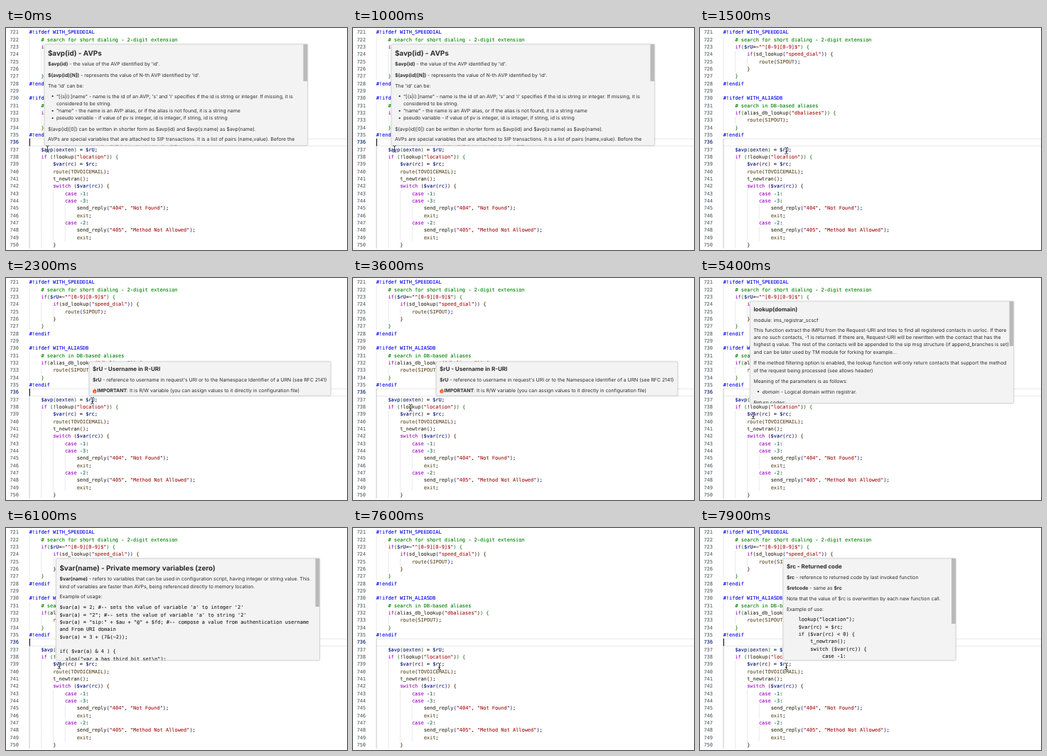
Recreate the animation shown at these times as an HTML page. Size 480 px wide and 313 px high, loop 8000 ms.

```html
<!DOCTYPE html>
<html lang="en">
<head>
<meta charset="utf-8">
<title>Editor hover help</title>
<style>
  html, body { margin: 0; width: 100%; height: 100%; overflow: hidden; background: #fff; }
  #stage { display: block; width: 480px; height: 313px; }
  text { white-space: pre; text-rendering: geometricPrecision; fill: currentColor; }
  .code { font: 6.95px "DejaVu Sans Mono", monospace; color: #222; }
  .code, .code tspan { fill: currentColor; stroke: currentColor; stroke-width: .1; }
  .help { font: 6.91px Inter, sans-serif; color: #2d2d2d; transform: translateY(-.4px); }
  .h2, .h3, .b { font-weight: 700; }
  .h2 { font-size: 9.87px; }
  .h3 { font-size: 8.02px; }
  .i { font-style: italic; }
  .box { fill: #f3f3f3; stroke: #c8c8c8; stroke-width: .6; filter: drop-shadow(0 .6px 1.2px rgba(0,0,0,.15)); }
  .thumb { fill: #bababa; }
  .guide { stroke: #d9d9d9; stroke-width: .58; }
  .guide.active { stroke: #a0a0a0; }
</style>
</head>
<body>
<svg id="stage" viewBox="0 0 480 313" xmlns="http://www.w3.org/2000/svg">
  <path d="M32.5 156.4H480M32.5 166.4H480" stroke="#e6e6e6" stroke-width=".9"/>
  <g id="editor"></g>
  <rect id="caret" x="32.8" y="156" width="1.1" height="10.3" fill="#111"/>
  <g id="hovers"></g>
  <g id="pointer" fill="none" stroke-linecap="round">
    <use href="#beam" stroke="#fff" stroke-width="1.8"/>
    <use href="#beam" stroke="#111" stroke-width=".85"/>
  </g>
  <defs>
    <path id="beam" d="M-2-4.6Q-.3-4.6 0-3.6Q.3-4.6 2-4.6M0-3.6V3.6M-2 4.6Q-.3 4.6 0 3.6Q.3 4.6 2 4.6M-1 1.4H1"/>
  </defs>
</svg>
<script>
const LOOP = 8000, STEP = 100;
const CHAR = 4.184, ROW = 10.335, LEFT = 32.7, TOP = 8.3, FIRST = 721, ACTIVE = 736;
const $ = id => document.getElementById(id);
const escapeText = s => s.replace(/&/g, '&amp;').replace(/</g, '&lt;');

const source = `#!ifdef WITH_SPEEDDIAL
    # search for short dialing - 2-digit extension
    if($rU=~"^[0-9][0-9]$") {
        if(sd_lookup("speed_dial")) {
            route(SIPOUT);
        }
    }
#!endif

#!ifdef WITH_ALIASDB
    # search in DB-based aliases
    if(alias_db_lookup("dbaliases")) {
        route(SIPOUT);
    }
#!endif

    $avp(oexten) = $rU;
    if (!lookup("location")) {
        $var(rc) = $rc;
        route(TOVOICEMAIL);
        t_newtran();
        switch ($var(rc)) {
            case -1:
            case -3:
                send_reply("404", "Not Found");
                exit;
            case -2:
                send_reply("405", "Method Not Allowed");
                exit;
        }`.split('\n');

// Syntax colours; brackets cycle through three colours by depth.
const rules = [
  [/^#!.*/, '#0000e6'], [/^#.*/, '#008000'], [/^"[^"]*"/, '#a31515'],
  [/^(if|switch|case)\b/, '#9d0cc2'], [/^-?\d+/, '#0a7350'],
  [/^\$\w+/, '#001080'], [/^(route|exit)\b/, '#5c4820'], [/^\w+(?=\()/, '#33301f'],
  [/^[A-Z]+\b/, '#5c4820'], [/^\w+/, '#1a2060'], [/^[(){}]/, null], [/^[^\w"$#(){}-]+|^./, '#222']
];
const bracketColors = ['#1c2f9c', '#2c7f2c', '#5e3018'];
let depth = 1;

function bracketColor(ch) {
  return bracketColors[('({'.includes(ch) ? depth++ : --depth) % 3];
}

function highlight(text) {
  let out = '';
  while (text) {
    const [pattern, color] = rules.find(([p]) => p.test(text));
    const token = text.match(pattern)[0];
    out += `<tspan style="color:${color || bracketColor(token)}">${escapeText(token)}</tspan>`;
    text = text.slice(token.length);
  }
  return out;
}

function guides(indent, y, active) {
  let out = '';
  for (let col = 0; col < indent; col += 4) {
    const x = LEFT + .3 + col * CHAR;
    out += `<path class="guide${active && !col ? ' active' : ''}" d="M${x} ${y}v${ROW}"/>`;
  }
  return out;
}

$('editor').innerHTML = source.map((line, i) => {
  const number = FIRST + i, y = TOP + i * ROW;
  const body = line.trimStart(), indent = line.length - body.length;
  return guides(number === ACTIVE ? 4 : indent, y - 7.5, number >= ACTIVE) +
    `<text class="code" x="5.4" y="${y}" style="color:${number === ACTIVE ? '#0b216f' : '#5a646a'}">${number}</text>` +
    `<text class="code" x="${LEFT + indent * CHAR}" y="${y}">${highlight(body)}</text>`;
}).join('');

// Text entries: [baseline, markup, style, x offset]
const hovers = [
  { from: 0, to: 1300, box: [54, 23, 370.5, 142.5], thumb: 52, text: [
    [39.3, '$avp(id) - AVPs', 'h2'],
    [53.5, '<b>$avp(id)</b> - the value of the AVP identified by \'id\'.'],
    [69, '<b>$(avp(id)[N])</b> - represents the value of N-th AVP identified by \'id\'.'],
    [84.3, 'The \'id\' can be:'],
    [99, '"[(s|i):]name" - name is the id of an AVP; \'s\' and \'i\' specifies if the id is string or integer. If missing, it is', 'item', 12],
    [109.3, 'considered to be string.', '', 12],
    [119.6, '"name" - the name is an AVP alias, or if the alias is not found, it is a string name', 'item', 12],
    [129.9, 'pseudo variable - if value of pv is integer, id is integer, if string, id is string', 'item', 12],
    [145, '$(avp(id)[0]) can be written in shorter form as $avp(id) and $avp(s:name) as $avp(name).'],
    [159.8, 'AVPs are special variables that are attached to SIP transactions. It is a list of pairs (name,value). Before the'],
    [170, 'transaction is created, the AVP list is attached to the SIP request.']
  ] },
  { from: 1700, to: 3700, box: [117, 118, 340, 48], flame: true, text: [
    [131.8, '$rU - Username in R-URI', 'h3'],
    [146.2, '<b>$rU</b> - reference to username in request\'s URI or to the Namespace Identifier of a URN (see RFC 2141)'],
    [161.2, '<b>IMPORTANT</b>: It is R/W variable (you can assign values to it directly in configuration file)', '', 6.4]
  ] },
  { from: 4000, to: 5500, box: [70.5, 33, 371, 143.5], thumb: 63, text: [
    [47.4, 'lookup(domain)', 'h3'],
    [62, 'module: ims_registrar_scscf'],
    [76, 'This function extract the IMPU from the Request-URI and tries to find all registered contacts in usrloc. If there'],
    [86.4, 'are no such contacts, -1 is returned. If there are, Request-URI will be rewritten with the contact that has the'],
    [96.8, 'highest q value. The rest of the contacts will be appended to the sip msg structure (if append_branches is set)'],
    [107.2, 'and can be later used by TM module for forking for example...'],
    [122.8, 'If the method filtering option is enabled, the lookup function will only return contacts that support the method'],
    [133.2, 'of the request being processed (see allows header)'],
    [148.2, 'Meaning of the parameters is as follows:'],
    [163, '<i>domain</i> - Logical domain within registrar.', 'item', 12],
    [178, 'Return codes:']
  ] },
  { from: 5800, to: 7400, box: [70.5, 43, 371, 143.5], thumb: 68, text: [
    [60.2, '$var(name) - Private memory variables (zero)', 'h2'],
    [74.6, '<b>$var(name)</b> - refers to variables that can be used in configuration script, having integer or string value. This'],
    [85, 'kind of variables are faster than AVPs, being referenced directly to memory location.'],
    [99.8, 'Example of usage:'],
    [114.2, '$var(a) = 2; #-- sets the value of variable \'a\' to integer \'2\'', 'code'],
    [124.5, '$var(a) = "2"; #-- sets the value of variable \'a\' to string \'2\'', 'code'],
    [134.9, '$var(a) = "sip:" + $au + "@" + $fd; #-- compose a value from authentication username', 'code'],
    [145.2, 'and From URI domain', 'code'],
    [155.5, '$var(a) = 3 + (7&amp;(~2));', 'code'],
    [176.2, 'if( $var(a) &amp; 4 ) {', 'code'],
    [186.5, 'xlog("var a has third bit set\\n");', 'code', 2 * CHAR]
  ] },
  { from: 7800, to: 8000, box: [117, 43, 243, 143.5], thumb: 92, text: [
    [57.8, '$rc - Returned code', 'h3'],
    [72, '<b>$rc</b> - reference to returned code by last invoked function'],
    [87, '<b>$retcode</b> - same as <b>$rc</b>'],
    [102, 'Note that the value of $rc is overwritten by each new function call.'],
    [117, 'Example of use:'],
    [131.2, 'lookup("location");', 'code', 4 * CHAR],
    [141.5, '$var(rc) = $rc;', 'code', 4 * CHAR],
    [151.9, 'if ($var(rc) &lt; 0) {', 'code', 4 * CHAR],
    [162.2, 't_newtran();', 'code', 8 * CHAR],
    [172.5, 'switch ($var(rc)) {', 'code', 8 * CHAR],
    [182.9, 'case -1:', 'code', 12 * CHAR]
  ] }
];

function helpLine(left, [y, markup, style = '', offset = 0]) {
  const x = left + offset;
  const spans = markup.replace(/<([bi])>/g, '<tspan class="$1">').replace(/<\/[bi]>/g, '</tspan>');
  const bullet = style === 'item' ? `<circle cx="${x - 5.3}" cy="${y - 2.8}" r="1.1" fill="#2d2d2d"/>` : '';
  return `${bullet}<text class="${style === 'code' ? style : 'help ' + style}" x="${x}" y="${y}">${spans}</text>`;
}

const flame = (x, y) => `<g transform="translate(${x} ${y})">
  <path d="M2.8 0C3.2 2 5.8 2.8 5.5 5A2.6 2.4 0 0 1 .3 5C.2 3.7 1 3.2 1.1 2.2Q2 2.5 2 3.2Q3.2 2 2.8 0Z" fill="#e8482c"/>
  <path d="M3 3.6Q4.5 4.6 4.1 6A1.3 1.1 0 0 1 1.7 6Q1.6 4.9 3 3.6Z" fill="#ffb13d"/></g>`;

$('hovers').innerHTML = hovers.map(({ box: [x, y, w, h], thumb, text, flame: hot }) => `<g>
  <rect class="box" x="${x}" y="${y}" width="${w}" height="${h}" rx="1"/>
  <svg x="${x}" y="${y}" width="${w}" height="${h}" viewBox="${x} ${y} ${w} ${h}">
    ${text.map(line => helpLine(x + 4.9, line)).join('')}
    ${hot ? flame(x + 4.9, 155) : ''}
    ${thumb ? `<rect class="thumb" x="${x + w - 6}" y="${y}" width="6" height="${thumb}"/>` : ''}
  </svg></g>`).join('');
const hoverNodes = [...$('hovers').children];

// Pointer moves: [start, end, x, y]
const moves = [
  [0, 0, 58.5, 170.5], [1000, 1400, 121.5, 173], [3200, 3500, 81, 183],
  [5000, 5300, 75, 194], [7000, 7400, 121.5, 195]
];
const ease = p => p * p * (3 - 2 * p);

function pointerAt(t) {
  let [, , x, y] = moves[0];
  for (const [start, end, toX, toY] of moves.slice(1)) {
    const p = ease(Math.min(1, Math.max(0, (t - start) / (end - start))));
    x += (toX - x) * p;
    y += (toY - y) * p;
  }
  return [x, y];
}

const show = (node, on) => node.setAttribute('visibility', on ? 'visible' : 'hidden');

function render(time) {
  const t = Math.floor((time % LOOP) / STEP) * STEP;
  show($('caret'), (t + 150) % 1000 < 500);
  hovers.forEach(({ from, to }, i) => show(hoverNodes[i], t >= from && t < to));
  $('pointer').setAttribute('transform', `translate(${pointerAt(t).join(' ')})`);
}

let startTime;
function tick(now) {
  startTime ??= now;
  render(now - startTime);
  requestAnimationFrame(tick);
}
render(0);
requestAnimationFrame(tick);
</script>
</body>
</html>
```
